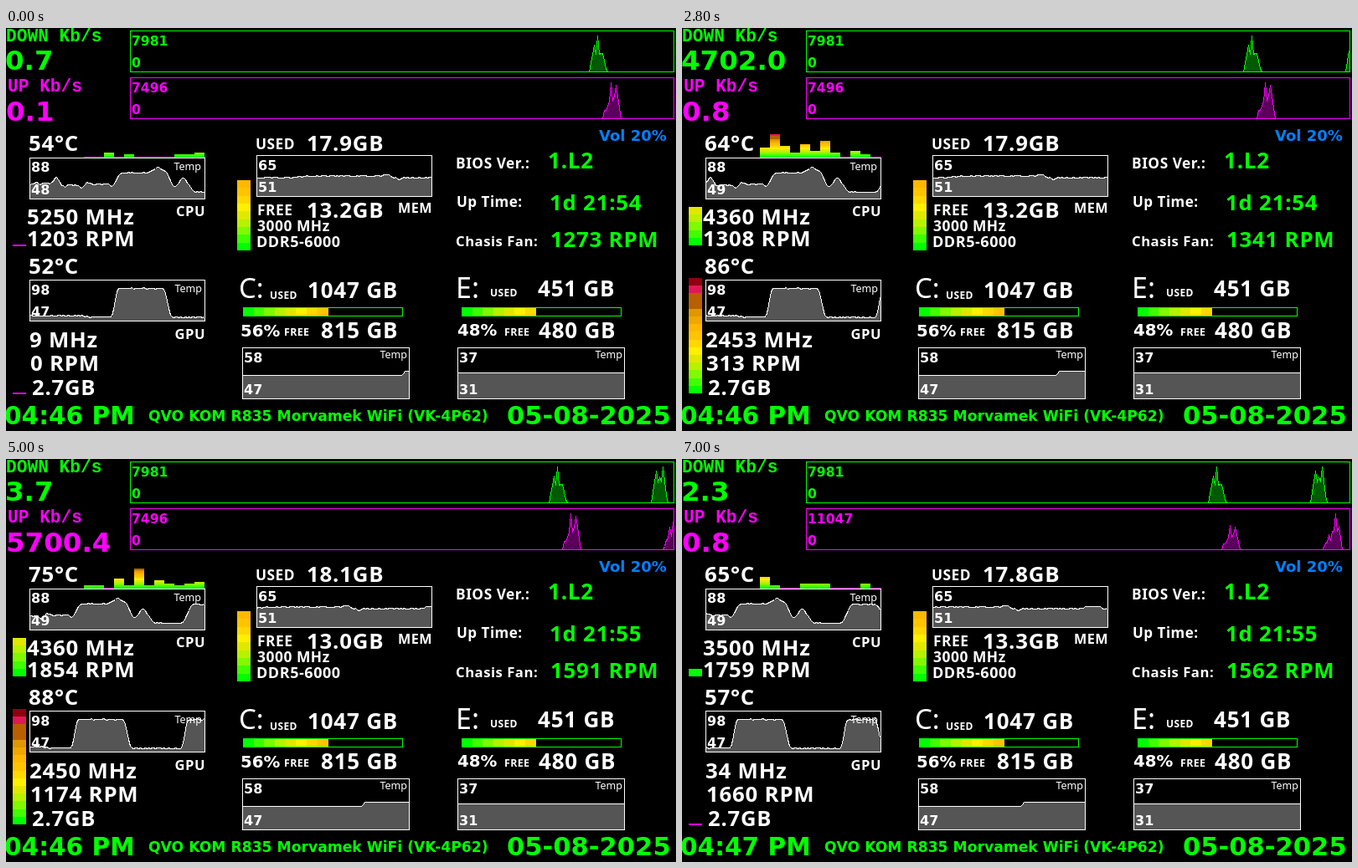
These frames come from a looping animation (800x482 px, 7200 ms). An HTML page:

```html
<!DOCTYPE html>
<html lang="en">
<head>
<meta charset="utf-8">
<title>System monitor</title>
<style>
html, body { margin: 0; width: 100%; height: 100%; overflow: hidden; background: #000; }
svg { display: block; }
text { fill: #fff; white-space: pre; }
.t { font-family: "Noto Sans", sans-serif; font-weight: 700; letter-spacing: .03em; }
.v { font-family: "DejaVu Sans", sans-serif; font-weight: 700; }
.r { font-family: "Noto Sans", sans-serif; }
.m { font-family: "Liberation Mono", monospace; font-weight: 700; }
.g { fill: #0f0; }
.p { fill: #f0f; }
.b { fill: #0080ff; }
rect, path { shape-rendering: crispEdges; }
</style>
</head>
<body>
<svg id="stage" width="800" height="482" viewBox="0 0 800 482"></svg>
<script>
const stage = document.getElementById('stage');
const LOOP = 7200, STEP = 200;
const LOAD_ON = 11, LOAD_OFF = 32;
const HEAT = ['#0f0', '#40ff00', '#80fa00', '#b8f200', '#e0e800', '#fff000', '#ffd800', '#ffc400',
  '#ffb800', '#f0a800', '#e09800', '#b86000', '#b86000', '#e01858', '#900010'];

// Markup helpers
const rect = (x, y, w, h, fill) => `<rect x="${x}" y="${y}" width="${w}" height="${h}" fill="${fill}"/>`;
const frame = (x, y, w, h, color) =>
  `<rect x="${x + .5}" y="${y + .5}" width="${w}" height="${h}" fill="none" stroke="${color}"/>`;
const text = (x, y, size, cls, s, anchor = 'start') =>
  `<text x="${x}" y="${y}" font-size="${size}" class="${cls}" text-anchor="${anchor}">${s}</text>`;

// Shaping helpers
const rand = (a, b) => {
  const s = Math.sin(a * 12.9898 + b * 78.233) * 43758.5453;
  return s - Math.floor(s);
};
const ease = (x, a, b) => {
  const k = Math.max(0, Math.min(1, (x - a) / (b - a)));
  return k * k * (3 - 2 * k);
};
const pulse = (x, a, b, c, d) => ease(x, a, b) - ease(x, c, d);
const peak = (x, mid, h, w) => Math.max(0, h * (1 - Math.abs(x - mid) / w));
const noise = x => {
  const i = Math.floor(x), k = x - i;
  return rand(i, 5) * (1 - k) + rand(i + 1, 5) * k;
};
// Readings at seven moments, sliding in between.
const MOMENTS = [0, 5, 10, 16, 24, 30, 34];
function slide(n, ...v) {
  let i = 0;
  while (i < 5 && n >= MOMENTS[i + 1]) i++;
  return v[i] + (v[i + 1] - v[i]) * (n - MOMENTS[i]) / (MOMENTS[i + 1] - MOMENTS[i]);
}

// Signals: height above the idle line at position x on an endless strip.
const down = x => Math.max(
  peak(x, 702, 32, 6), peak(x, 706, 43, 4), peak(x, 711, 27, 6),
  peak(x, 824, 38, 6), peak(x, 828, 30.4, 4), peak(x, 832, 43, 5));
const up = x => Math.max(
  peak(x, 715, 15, 3), peak(x, 719, 20, 4), peak(x, 722, 43, 4), peak(x, 728, 40, 6),
  peak(x, 837, 16, 4), peak(x, 840, 27, 4), peak(x, 844, 32.7, 4), peak(x, 848, 63.4, 4),
  peak(x, 852, 40, 4));
const cpu = x => .5 + rand(x, 3) * 1.2 +
  pulse(x, 20, 28, 120, 130) * (4 + 8 * noise(x / 5)) + peak(x, 59, 8, 7) +
  23 * pulse(x, 122, 138, 190, 204) + peak(x, 181, 7, 12) + peak(x, 211, 19, 13) +
  22.5 * pulse(x, 257, 271, 298, 314);
const gpu = x => rand(x, 3) * 1.6 + 1.5 * ease(x, 110, 80) +
  34 * (pulse(x, 125, 134, 187, 198) + pulse(x, 257, 265, 298, 308));
const mem = x => rand(x, 3) + 2 * pulse(x, 338, 364, 456, 460) + peak(x, 454, 2.5, 7) -
  peak(x, 469, 2.5, 4) + 2.5 * pulse(x, 544, 550, 566, 570);
const diskC = x => 5 * ease(x, 472, 476);
const diskE = () => 0;

// Line with filled area; the strip moves 2 px per step.
function graph(x0, x1, base, yAt, n, line, fill) {
  let d = '';
  for (let x = x0; x <= x1; x += 2) d += `L${x + .5} ${Math.round(yAt(x + 2 * n)) + .5}`;
  const body = d.slice(1);
  return `<path d="M${x0 + .5} ${base + .5}L${body}V${base + .5}Z" fill="${fill}"/>` +
    `<path d="M${body}" fill="none" stroke="${line}"/>`;
}
const panel = (x, y, w, h, idle, f, n) =>
  graph(x, x + w, y + h, p => idle - f(p), n, '#fff', '#555') + frame(x, y, w, h, '#fff');
const net = (y, f, scale, n, line, fill) =>
  graph(150, 796, y + 49, p => y + 49 - f(p) * scale, n, line, fill) + frame(148, y, 649, 49, line);

function column(x, bottom, w, seg, count) {
  let s = '';
  for (let i = 0; i < count; i++) {
    const top = Math.round(bottom - seg * (i + 1));
    s += rect(x, top, w, Math.round(bottom - seg * i) - top, HEAT[i]);
  }
  return s;
}
const meter = (bottom, count) =>
  count ? column(8, bottom, 16, 9.2, count) : rect(8, bottom - 1, 16, 2, '#f0f');

function diskBar(x, count) {
  let s = '';
  for (let i = 0; i < count; i++) s += rect(x + Math.round(i * 12.67), 335, 13, 9, HEAT[i]);
  return s + frame(x, 334, 190, 10, '#0f0');
}

function cores(n, busy) {
  let s = rect(93, 154, 145, 1, '#f0f');
  for (let i = 0; i < 12; i++) {
    const top = busy ? (i < 7 ? 15 : 6) : (i ? 4 : 8);
    const v = Math.floor(top * rand(n + 3, i + 1) ** (busy ? 1 : 2));
    if (v > 1) s += column(93 + 12 * i, 155, 12, 2, v);
  }
  return s;
}

const LABELS = [
  [0, 16, 21.2, 'm g', 'DOWN Kb/s'], [2, 76, 21.2, 'm p', 'UP Kb/s'],
  [150, 21, 15.6, 'v g', '7981'], [150, 47, 15.6, 'v g', '0'], [150, 103, 15.6, 'v p', '0'],
  [708, 135, 18, 'v b', 'Vol 20%'],
  [30, 172, 16, 'v', '88'], [30, 319, 16, 'v', '98'], [30, 345, 16, 'v', '47'],
  [301, 170, 16, 'v', '65'], [301, 196, 16, 'v', '51'],
  [284, 400, 16, 'v', '58'], [284, 438, 16, 'v', '47'],
  [541, 400, 16, 'v', '37'], [541, 438, 16, 'v', '31'],
  [233, 170, 12.5, 'r', 'Temp', 'end'], [234, 316, 12.5, 'r', 'Temp', 'end'],
  [479, 395, 12.5, 'r', 'Temp', 'end'], [736, 395, 12.5, 'r', 'Temp', 'end'],
  [238, 225, 16.6, 't', 'CPU', 'end'], [238, 372, 16.6, 't', 'GPU', 'end'],
  [509, 221, 16.2, 't', 'MEM', 'end'],
  [298, 145, 17.3, 't', 'USED'], [300, 224, 17.3, 't', 'FREE'],
  [300, 243, 17.4, 't', '3000 MHz'], [299, 262, 18, 't', 'DDR5-6000'],
  [537, 168, 17.3, 't', 'BIOS Ver.:'], [538, 214, 17, 't', 'Up Time:'],
  [537, 261, 16.7, 't', 'Chasis Fan:'], [647, 168, 26, 't g', '1.L2'],
  [278, 323, 33, 'r', 'C:'], [537, 323, 34, 'r', 'E:'],
  [315, 324, 12, 't', 'USED'], [578, 321, 12, 't', 'USED'],
  [332, 368, 12.4, 't', 'FREE'], [595, 368, 12.4, 't', 'FREE'],
  [360, 323, 26, 't', '1047 GB'], [376, 371, 26, 't', '815 GB'],
  [635, 321, 26, 't', '451 GB'], [636, 371, 26, 't', '480 GB'],
  [280, 369, 19.8, 'v', '56%'], [539, 368, 19.8, 'v', '48%'],
  [170, 469.5, 17.2, 'v g', 'QVO KOM R835 Morvamek WiFi (VK-4P62)'],
  [598, 473.5, 30.6, 'v g', '05-08-2025'],
  [31, 439, 25.6, 't', '2.7GB']
].map(a => text(...a)).join('');

function draw(n) {
  const busy = n >= LOAD_ON && n < LOAD_OFF;
  const rescaled = n >= 26;
  const now = 2 * n;
  const big = (x, y, s, cls = 't') => text(x, y, 25.8, cls, s);
  const speed = (h, max, seed) => (h / 43 * max || rand(n, seed) * 4).toFixed(1);

  const settle = Math.exp(-n);
  const cpuMhz = busy ? 4360 - 20 * (n > 26) : Math.round((3500 + 1750 * settle) / 50) * 50;
  const gpuMhz = busy ? Math.round(2453 - .0051 * (n - 16) ** 3)
    : n < LOAD_ON ? Math.round(1 + 8 * settle) : 34;
  const cpuTemp = Math.round(53.2 + cpu(238 + now) / 1.1);
  const gpuTemp = Math.round(51.6 + gpu(238 + now) * 1.04);
  const cpuFan = Math.round(slide(n, 1203, 1287, 1185, 1430, 1854, 1863, 1759));
  const gpuFan = Math.round(slide(n, 0, 0, 0, 625, 1174, 1593, 1660));
  const caseFan = Math.round(slide(n, 1273, 1279, 1257, 1425, 1591, 1593, 1562));
  const used = slide(n, 17.9, 17.9, 17.8, 17.9, 18.1, 18.1, 17.8).toFixed(1);

  stage.innerHTML =
    net(3, down, 1, n, '#0f0', '#005a00') +
    net(59, up, rescaled ? 7496 / 11047 : 1, n, '#f0f', '#5a005a') +
    cores(n, busy) +
    panel(28, 155, 209, 49, 197, cpu, n) +
    panel(28, 301, 209, 49, 346, gpu, n) +
    panel(299, 152, 209, 49, 179, mem, n) +
    panel(282, 382, 199, 61, 415, diskC, n) +
    panel(539, 382, 199, 61, 412, diskE, n) +
    column(276, 266, 16, 9.33, 9) +
    meter(260, busy ? 5 : n > 2 ? 1 : 0) +
    meter(437, busy ? 15 : 0) +
    diskBar(283, 8) + diskBar(544, 7) +
    LABELS +
    text(-1, 50, 32.5, 'v g', speed(down(796 + now), 7981, 1)) +
    text(0, 111, 32.5, 'v p', speed(up(796 + now), 7496, 2)) +
    text(150, 77, 15.6, 'v p', rescaled ? '11047' : '7496') +
    text(30, 199, 16, 'v', n < 12 ? '48' : '49') +
    big(27, 147, cpuTemp + '°C') +
    big(25, 235, cpuMhz + ' MHz') +
    big(25, 261, cpuFan + ' RPM') +
    big(27, 293.5, gpuTemp + '°C') +
    big(28, 382, gpuMhz + ' MHz') +
    big(29, 410, gpuFan + ' RPM') +
    big(359, 147, used + 'GB') +
    big(359, 227, (31.1 - used).toFixed(1) + 'GB') +
    big(649, 218, n < 22 ? '1d 21:54' : '1d 21:55', 't g') +
    big(650, 262, caseFan + ' RPM', 't g') +
    text(-2, 473.5, 29.6, 'v g', n < 33 ? '04:46 PM' : '04:47 PM');
}

let last = -1;
function tick() {
  let n = Math.floor(performance.now() % LOOP / STEP);
  if (n > 10) n--; // one step lasts twice as long
  if (n !== last) draw(last = n);
  requestAnimationFrame(tick);
}
tick();
</script>
</body>
</html>
```
